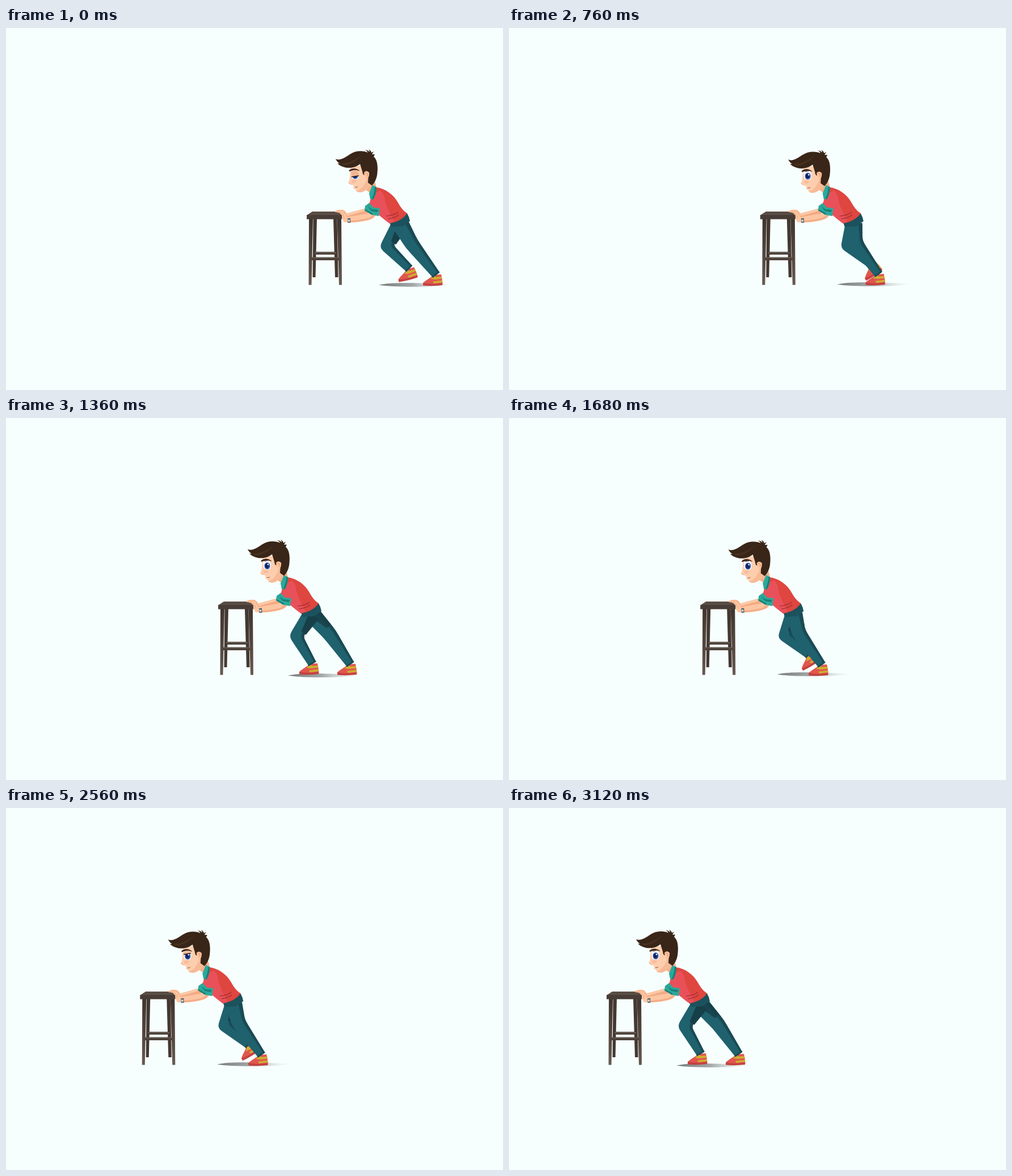
An HTML page for the animation above (5000 ms loop, 876x639 px).

```html
<!DOCTYPE html>
<html lang="en">
<head>
<meta charset="utf-8">
<title>Pushing a stool</title>
<style>
html, body { margin: 0; width: 100%; height: 100%; overflow: hidden; background: #f7fffe; }
svg { display: block; width: 100%; height: 100%; }
</style>
</head>
<body>
<svg viewBox="0 0 876 639">
  <defs>
    <linearGradient id="fade">
      <stop offset="0" stop-color="#777b7b"/>
      <stop offset=".45" stop-color="#a3a8a8"/>
      <stop offset="1" stop-color="#dfe6e6" stop-opacity="0"/>
    </linearGradient>
    <linearGradient id="wood" x2="0" y2="1">
      <stop offset="0" stop-color="#40352f"/>
      <stop offset=".6" stop-color="#554840"/>
      <stop offset="1" stop-color="#665a52"/>
    </linearGradient>
    <clipPath id="socket"><path d="M608 254Q614 248 620 253Q624 260 620 266Q613 269 609 264Z"/></clipPath>
    <g id="shoe">
      <path d="M-24 15C-18 9 -11 7 -6 1L8 0Q10 8 10.500 17L-23 19Z" fill="#e0564e"/>
      <path d="M-11 8L-5 2L-1 4.500L9 4L9.500 7.500L-3 9ZM-7 12.500L10 10.500L10.500 14L-5 16Z" fill="#cfae30"/>
      <path d="M-24 15Q-10 18 10.500 15.500L10 19Q-8 21 -24 19.500Z" fill="#c4413f"/>
    </g>
  </defs>
  <g id="scene">
    <path id="shadow" d="M0 0C22 -5 60 -4 133 -1C112 4 28 5 0 0Z" fill="url(#fade)"/>

    <g id="stool">
      <path d="M541.500 336H548L545.500 440H540.500ZM577 336H583.500L585.500 440H580Z" fill="#433831"/>
      <path d="M544 395H582V400H544Z" fill="#4a3f37"/>
      <path d="M544 396.500H582" stroke="#7c756b"/>
      <path d="M534 336H541L538.500 453.500H533.500ZM583.500 336H591L592 453.500H587Z" fill="url(#wood)"/>
      <path d="M538.500 404.500H587V410H538Z" fill="#4d423a"/>
      <path d="M539 405.500H587" stroke="#6e635b"/>
      <path d="M540 324H585L593 330.500H530Z" fill="#594d45"/>
      <path d="M530 330H593V336Q592 337.500 590 337.500H530Z" fill="#483d36"/>
    </g>

    <g id="legs"></g>
    <path d="M676 343L707 327Q711 334 712 341L699 350L679 351Z" fill="#1b525d"/>

    <g id="farArm">
      <path d="M598 328L635 318L639 328L600 336Z" fill="#f3aa83"/>
      <path d="M599 328L635 318.500L636 322L601 332Z" fill="#fdc9a6"/>
      <path d="M580 323Q586 320 594 321Q599 323 601 329L600 336L594 331Q588 325 580 325Z" fill="#f8b891"/>
    </g>

    <g id="torso">
      <path d="M634 266L650 270L653 281L643 292L633 285Z" fill="#f5b18b"/>
      <path d="M651 281C668 283 683 293 692 310C697 319 702 324 707 327C701 337 688 343 676 345C668 339 662 333 656 329L641 312C642 300 646 290 651 281Z" fill="#de463f"/>
      <path d="M653 290C648 296 642 305 639 312L657 321Q666 318 668 307Q668 294 660 287Z" fill="#e9515a"/>
      <path d="M657 321Q665 316 668 305Q671 318 684 341L676 345Q665 337 657 330Z" fill="#e9515a"/>
      <g fill="none" stroke="#9d2c33" stroke-width="1.200">
        <path d="M670 332Q684 331 691 325M673 337Q686 335 692 330"/>
      </g>
      <path d="M646 277L653 281Q653 293 647 303L642 302L640 292Z" fill="#2ba99b"/>
      <path d="M653 281Q653 293 647 303L645 301Q650 290 650 280Z" fill="#178077"/>
    </g>

    <g id="nearArm">
      <path d="M599 334L634 328L654 326Q651 336 640 339Q622 344 599 343Z" fill="#fdc6a2"/>
      <path d="M604 343Q632 342 647 335Q650 332 651 327L640 335Q622 340 602 340Z" fill="#f4ac86"/>
      <path d="M586 324Q593 322 597 328L601 335L602 343L596 343L592 336V331Z" fill="#fdc6a2"/>
      <path d="M587 325Q594 326 596 336" fill="none" stroke="#e59872" stroke-width=".8"/>
      <path d="M602 336L607 335.500L607.500 343.500L602.500 344Z" fill="#5b6269"/>
      <circle cx="604.500" cy="340" r="2" fill="#c9d7da"/>
      <path d="M633 314L640 309L648 317L659 318L657 332L646 330L632 322Z" fill="#2ba99b"/>
      <path d="M637 314L645 320L656 321L655 325L644 323ZM633 320L646 327L645 330L632 322Z" fill="#178077"/>
    </g>

    <g id="head">
      <path d="M607 246C606 256 607 264 604 272Q604 276 610 276L613 280L612 283L616 285Q617 290 626 290Q636 287 645 276L640 240Z" fill="#fdceae"/>
      <path d="M637 262L645 276Q637 287 626 290Q620 290 617 288Q631 284 637 262Z" fill="#f7ba96"/>
      <ellipse cx="613" cy="271" rx="4.500" ry="3" fill="#f7ad96" opacity=".55"/>
      <path d="M604 272Q604 276 610 276" fill="none" stroke="#eda286"/>
      <path d="M615 281Q618 282 620 280" fill="none" stroke="#9c493f"/>
      <path d="M581 231C588 235 597 229 606 223C616 216 630 216 638 220Q637 217 633 215Q639 216 641 219Q641 216 639 214Q644 217 644 220L648 218L645 223L650 223L648 227C655 233 656 245 654 260Q652 271 645 278L638 273L639 258L633 259Q629 261 628 253L624 240C617 246 605 249 594 245Q588 243 584 239L588 239Q583 236 581 231Z" fill="#392618"/>
      <path d="M590 239Q610 239 628 223Q613 242 595 242Z" fill="#47311f"/>
      <path d="M631 255Q635 250 640 255Q641 264 635 267Q632 264 631 255Z" fill="#fdc39d"/>
      <path d="M633 256Q638 254 637 262" fill="none" stroke="#d98d68"/>
      <path d="M605 251Q614 245 623 252Q614 248.500 605 253Z" fill="#2c1c14" stroke="#2c1c14" stroke-width=".5"/>
      <g clip-path="url(#socket)">
        <path d="M606 247H626V270H606Z" fill="#f7fcff"/>
        <ellipse cx="615.500" cy="260.500" rx="5" ry="6" fill="#2550ac"/>
        <ellipse cx="615" cy="260.500" rx="3" ry="4" fill="#142258"/>
        <circle cx="617" cy="258" r="1.300" fill="#fff"/>
        <path id="lid" d="M604 230H628V249L604 253Z" fill="#f2b591" stroke="#2c1c22" stroke-width="1.500"/>
      </g>
    </g>
  </g>
</svg>
<script>
const $ = id => document.getElementById(id);
const STEP = 40, LOOP = 5000, STOP = 3120, CYCLE = 880;

// phase, knee x, knee y, ankle x, ankle y, shoe angle
const stride = [
  [0, 715, 381, 759, 435, 0],
  [40, 722, 382, 759, 434, 0],
  [160, 699, 382, 740, 415, -42],
  [360, 673, 384, 717, 417, -30],
  [400, 669, 385, 706.5, 424, -22],
  [440, 665, 385, 706.5, 424, -13],
  [480, 667, 385, 697, 433, 0],
  [600, 680, 386, 719, 430, 0],
  [800, 704, 380, 745, 435, 0],
  [840, 705, 380, 750, 434, 0]
];

// phase, head dx, head dy, shadow x, shadow y
const bob = [
  [0, 0, 0, 657, 453.5],
  [40, 1, .5, 653, 454.5],
  [160, -2, 1.5, 665.5, 452.5],
  [360, -1.5, 1, 665.5, 452.5],
  [400, -.5, .5, 660, 453.5]
];

const blinks = [-40, 1080, 2640];

function sample(keys, time, period) {
  const p = (time % period + period) % period;
  let i = keys.length - 1;
  while (keys[i][0] > p) i--;
  const a = keys[i], b = keys[(i + 1) % keys.length];
  const end = b[0] > a[0] ? b[0] : b[0] + period;
  const k = (p - a[0]) / (end - a[0]);
  return a.slice(1).map((v, n) => v + (b[n + 1] - v) * k);
}

const mix = (a, b, k) => [a[0] + (b[0] - a[0]) * k, a[1] + (b[1] - a[1]) * k];
const pt = p => p[0].toFixed(2) + ' ' + p[1].toFixed(2);
const clamp = v => Math.max(0, Math.min(1, v));

function normal(a, b) {
  const x = b[0] - a[0], y = b[1] - a[1], d = Math.hypot(x, y);
  return [-y / d, x / d];
}

// A bent band between two offsets from the bones; positive is the front side.
function band(joints, radii, front, back) {
  const [h, k, a] = joints;
  const n = [normal(h, k), normal(h, a), normal(k, a)];
  const edge = s => joints.map((p, i) =>
    [p[0] + n[i][0] * radii[i] * s, p[1] + n[i][1] * radii[i] * s]);
  const bend = e => `${pt(mix(e[0], e[1], .82))}Q${pt(e[1])} ${pt(mix(e[1], e[2], .15))}L${pt(e[2])}`;
  const f = edge(front), b = edge(back).reverse();
  return `M${pt(f[0])}L${bend(f)}L${pt(b[0])}L${pt(mix(b[0], b[1], .85))}` +
    `Q${pt(b[1])} ${pt(mix(b[1], b[2], .18))}L${pt(b[2])}Z`;
}

function makeLeg(far) {
  const g = document.createElementNS('http://www.w3.org/2000/svg', 'g');
  g.innerHTML = `<use href="#shoe"/><path fill="#1f616d"/><path fill="#194b55"/>
    <path fill="#173f48"/>
    <path stroke="#194b55" stroke-width="3" stroke-linecap="round"/>`;
  $('legs').append(g);
  const [shoe, cloth, shade, dark, hem] = g.children;
  const radii = [15, 12.5, 7.5];
  return time => {
    const [kx, ky, ax, ay, turn] = sample(stride, time + (far ? CYCLE / 2 : 0), CYCLE);
    const dx = far ? 5 : 0;
    const hip = [695, 346], knee = [kx + dx, ky], ankle = [ax + dx, ay];
    const cuff = [ankle[0] - 1.5, ankle[1]];
    const joints = [hip, knee, cuff];
    const n = normal(knee, cuff);
    const side = s => [cuff[0] + n[0] * s, cuff[1] + n[1] * s];
    shoe.setAttribute('transform', `translate(${pt(ankle)}) rotate(${turn})`);
    cloth.setAttribute('d', band(joints, radii, 1, -1));
    shade.setAttribute('d', band(joints, radii, -.55, -1));
    // The inner thigh darkens while the leg is ahead of the hips.
    const mid = mix(hip, knee, .75), m = normal(hip, knee);
    const off = (p, r) => pt([p[0] + m[0] * r, p[1] + m[1] * r]);
    dark.setAttribute('d', `M${off(hip, 5)}L${off(mid, -3)}L${off(mid, -13)}L${off(hip, -15)}Z`);
    dark.setAttribute('opacity', Math.max(far ? .8 : 0, clamp((695 - kx) / 20)));
    hem.setAttribute('d', `M${pt(side(6.5))}L${pt(side(-6.5))}`);
  };
}

const legs = [makeLeg(true), makeLeg(false)];
const move = (id, x, y) => $(id).setAttribute('transform', `translate(${x} ${y})`);

function draw(now) {
  const t = Math.min(STOP, Math.floor(now % LOOP / STEP) * STEP);
  const [hx, hy, sx, sy] = sample(bob, t, CYCLE / 2);
  const lid = Math.max(0, ...blinks.map(c => 1 - Math.abs(t - c) / 120));
  move('scene', -358 * t / STOP, 0);
  move('head', hx, hy);
  move('shadow', sx, sy);
  move('lid', 0, lid * 16);
  legs.forEach(leg => leg(t));
}

const start = performance.now();
function tick() {
  draw(performance.now() - start);
  requestAnimationFrame(tick);
}
tick();
</script>
</body>
</html>
```
